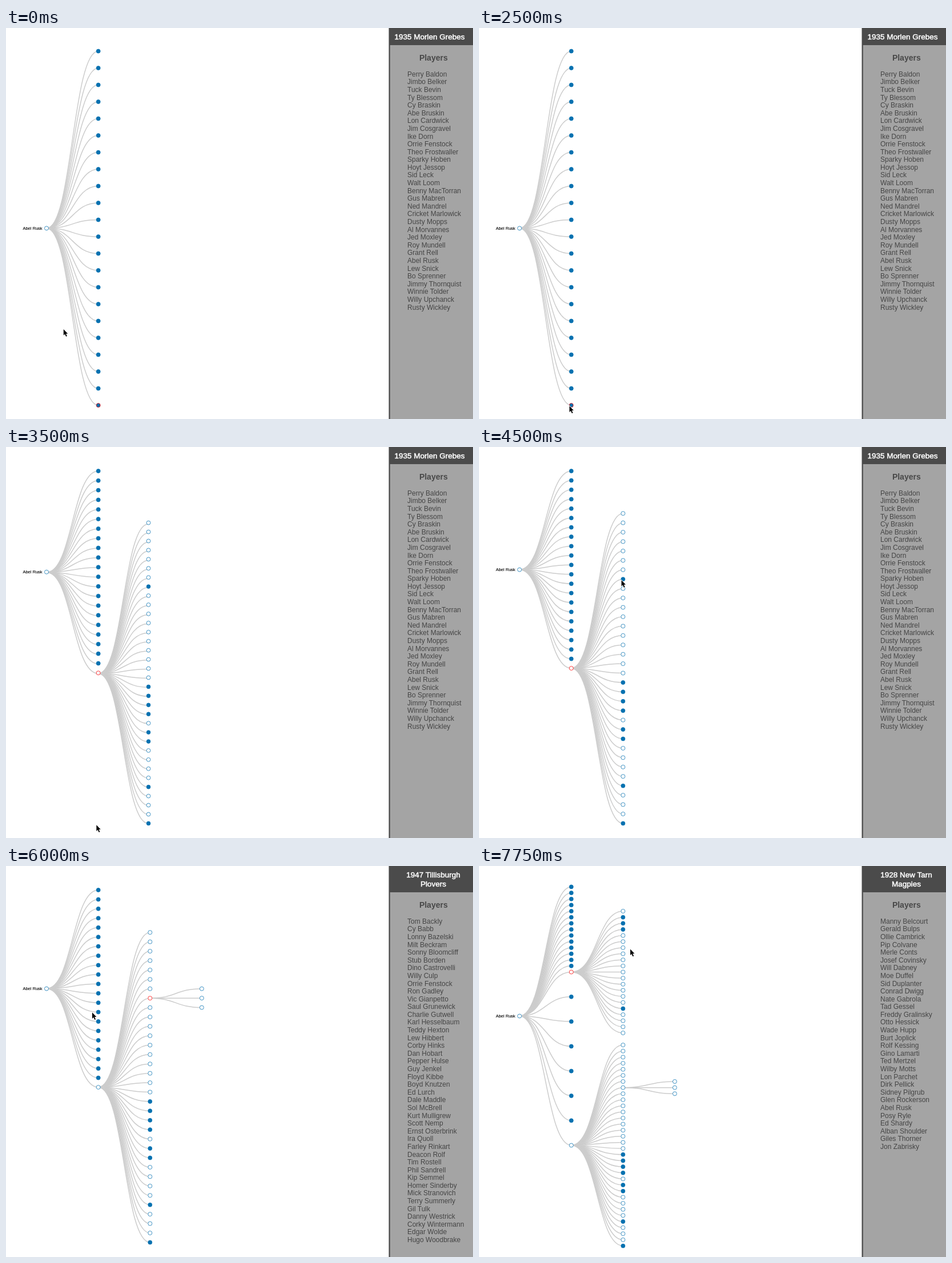
An HTML page for the animation above (8000 ms loop, 818 by 684 pixels).

```html
<!DOCTYPE html>
<html lang="en">
<head>
<meta charset="utf-8">
<title>Teammates tree</title>
<style>
  html, body { margin: 0; width: 100%; height: 100%; overflow: hidden; background: #fff; }
  svg { display: block; width: 100vw; height: 100vh; font-family: "Liberation Sans", Arial, sans-serif; }
  .link { fill: none; stroke: #ccc; stroke-width: 1.5; }
  .node { stroke: #0571b0; stroke-width: .75; }
  .selected { stroke: #f00; }
  .label { font-size: 7.5px; text-anchor: end; stroke: #000; stroke-width: .12; }
  .title { font-size: 13.5px; text-anchor: middle; fill: #fff; stroke: #fff; stroke-width: .5; }
  .heading { font-size: 14px; font-weight: bold; text-anchor: middle; fill: #484848; }
  .player { font-size: 12px; fill: #454545; }
  .cursor { fill: #000; stroke: #fff; stroke-width: 1.6; paint-order: stroke; stroke-linejoin: round; }
</style>
</head>
<body>
<svg id="stage" viewBox="0 0 818 684"></svg>
<script>
const LOOP = 8000, TICK = 250, DURATION = 750, LINK_LAG = 6;
const COLUMNS = [71, 161.7, 252.3, 342.9];
const RADIUS = 3.5;
const HUB = 'Abel Rusk';

const panels = [
  { from: 0, title: ['1935 Morlen Grebes'], titleX: 742, players:
    `Perry Baldon,Jimbo Belker,Tuck Bevin,Ty Blessom,Cy Braskin,Abe Bruskin,Lon Cardwick,Jim Cosgravel,
    Ike Dorn,Orrie Fenstock,Theo Frostwaller,Sparky Hoben,Hoyt Jessop,Sid Leck,Walt Loom,
    Benny MacTorran,Gus Mabren,Ned Mandrel,Cricket Marlowick,Dusty Mopps,Al Morvannes,Jed Moxley,
    Roy Mundell,Grant Rell,${HUB},Lew Snick,Bo Sprenner,Jimmy Thornquist,Winnie Tolder,
    Willy Upchanck,Rusty Wickley` },
  { from: 5000, title: ['1947 Tillisburgh', 'Plovers'], titleX: 748.5, players:
    `Tom Backly,Cy Babb,Lonny Bazelski,Milt Beckram,Sonny Bloomcliff,Stub Borden,Dino Castrovelli,
    Willy Culp,Orrie Fenstock,Ron Gadley,Vic Gianpetto,Saul Grunewick,Charlie Gutwell,
    Karl Hesselbaum,Teddy Hexton,Lew Hibbert,Corby Hinks,Dan Hobart,Pepper Hulse,Guy Jenkel,
    Floyd Kibbe,Boyd Knutzen,Ed Lurch,Dale Maddle,Sol McBrell,Kurt Mulligrew,Scott Nemp,
    Ernst Osterbrink,Ira Quoll,Farley Rinkart,Deacon Rolf,Tim Rostell,Phil Sandrell,Kip Semmel,
    Homer Sinderby,Mick Stranovich,Terry Summerly,Gil Tulk,Danny Westrick,Corky Wintermann,
    Edgar Wolde,Hugo Woodbrake` },
  { from: 7000, title: ['1928 New Tarn', 'Magpies'], titleX: 748.5, players:
    `Manny Belcourt,Gerald Bulps,Ollie Cambrick,Pip Colvane,Merle Conts,Josef Covinsky,Will Dabney,
    Moe Duffel,Sid Duplanter,Conrad Dwigg,Nate Gabrola,Tad Gessel,Freddy Gralinsky,Otto Hessick,
    Wade Hupp,Burt Joplick,Rolf Kessing,Gino Lamarti,Ted Mertzel,Wilby Motts,Lon Parchet,
    Dirk Pellick,Sidney Pilgrub,Glen Rockerson,${HUB},Posy Ryle,Ed Shardy,Alban Shoulder,
    Giles Thorner,Jon Zabrisky` }
];

// Pointer tip: time, x, y
const pointer = [
  [0, 100.8, 527], [250, 142, 588], [500, 136.4, 668.5], [750, 151, 666], [1000, 159, 661],
  [2500, 158.4, 661.3], [3750, 342, 300], [4000, 342.3, 280.3], [4250, 258.4, 222.4],
  [4500, 249.5, 233], [5500, 235.5, 224.3], [5750, 177.5, 321], [6000, 151, 256.3],
  [6250, 162, 284], [6500, 159, 273.3], [7500, 189.5, 250], [7750, 265, 145.5]
];

const run = (prefix, parent, depth, count, first, step) =>
  Array.from({ length: count }, (_, i) => ({ id: prefix + i, parent, x: COLUMNS[depth], y: first + i * step }));
const layout = (rootY, ...runs) =>
  new Map([{ id: 'root', x: COLUMNS[0], y: rootY }, ...runs.flat()].map(n => [n.id, n]));

// t: teams of the hub, a/b: players of an opened team, c: teams of an opened player
const wide = run('t', 'root', 1, 22, 40.5, 29.5);
const medium = run('t', 'root', 1, 22, 42, 16.43);
const tight = run('t', 'root', 1, 22, 36.4, 10.65);
tight.forEach((n, i) => { if (i > 14) n.y = 185.5 + (i - 14) * 43.3; });
const rosterMedium = run('a', 't21', 2, 34, 116.2, 16.43);

const stages = [
  { start: -LOOP, selected: 't21', nodes: layout(350.3, wide) },
  { start: 2897, selected: 't21', source: 't21', nodes: layout(214.6, medium, rosterMedium) },
  { start: 4772, selected: 'a7', source: 'a7',
    nodes: layout(214.6, medium, rosterMedium, run('c', 'a7', 3, 3, 214.7, 16.43)) },
  { start: 6649, selected: 't14', source: 't14',
    nodes: layout(262.5, tight, run('b', 't14', 2, 21, 79, 10.65),
      run('a', 't21', 2, 34, 313.1, 10.65), run('c', 'a7', 3, 3, 377, 10.65)) }
];

const closedPlayers = new Set('a7 a18 a19 a20 a21 a23 a24 a29 a33 b1 b2 b3 b16'.split(' '));
const openedAt = { t21: 1, a7: 2, t14: 3 };
const isClosed = (id, stage) =>
  (id[0] === 't' || closedPlayers.has(id)) && !(stage >= openedAt[id]) ? 1 : 0;

const lerp = (a, b, p) => a + (b - a) * p;
const cubicInOut = t => t < .5 ? 4 * t ** 3 : 1 - 4 * (1 - t) ** 3;
const progress = elapsed => cubicInOut(Math.min(1, Math.max(0, elapsed / DURATION)));
const latest = (items, test) => items.filter(test).pop();
const text = (cls, x, y, content) => `<text class="${cls}" x="${x}" y="${y}">${content}</text>`;

function drawTree(time) {
  const stage = latest([...stages.keys()], i => stages[i].start <= time);
  const { start, selected, source, nodes } = stages[stage];
  const before = stage ? stages[stage - 1].nodes : nodes;
  const place = (node, p) => {
    const from = before.get(node.id) || before.get(source);
    return [lerp(from.x, node.x, p), lerp(from.y, node.y, p)];
  };
  const nodeP = progress(time - start), linkP = progress(time - start - LINK_LAG);
  let links = '', circles = '';
  for (const node of nodes.values()) {
    if (node.parent) {
      const [x0, y0] = place(nodes.get(node.parent), linkP), [x1, y1] = place(node, linkP);
      const mid = (x0 + x1) / 2;
      links += `<path class="link" d="M${x0},${y0}C${mid},${y0} ${mid},${y1} ${x1},${y1}"/>`;
    }
    const [x, y] = place(node, nodeP);
    const r = RADIUS * (before.has(node.id) ? 1 : nodeP);
    const blue = lerp(isClosed(node.id, stage - 1), isClosed(node.id, stage), nodeP);
    const fill = [5, 113, 176].map(c => Math.round(lerp(255, c, blue)));
    circles += `<circle class="node${node.id === selected ? ' selected' : ''}" cx="${x}" cy="${y}" r="${r}" fill="rgb(${fill})"/>`;
  }
  const rootY = place(nodes.get('root'), nodeP)[1];
  return links + circles + text('label', 63.6, rootY + 2.7, HUB);
}

function drawPanel(time) {
  const { title, titleX, players } = latest(panels, p => p.from <= time);
  const shift = (title.length - 1) * 16;
  return `<rect x="670.5" width="147.5" height="684" fill="#4b4b4b"/>
    <rect x="672.75" y="${30 + shift}" width="145.25" height="${654 - shift}" fill="#a4a4a4"/>` +
    title.map((line, i) => text('title', titleX, 19.8 + i * 16, line)).join('') +
    text('heading', 748.8, 57.3 + shift, 'Players') +
    players.split(',').map((name, i) => text('player', 703, 84.8 + shift + i * 13.59, name.trim())).join('');
}

function drawCursor(time) {
  const [, x, y] = latest(pointer, p => p[0] <= time);
  return `<path class="cursor" transform="translate(${x} ${y})" d="M0,0V10.6L2.4,8.4L4.3,12.8L6.1,12L4.2,7.8H7.4Z"/>`;
}

const svg = document.getElementById('stage');
let shown = -1;
function frame() {
  const time = Math.floor(performance.now() % LOOP / TICK) * TICK;
  if (time !== shown) {
    svg.innerHTML = drawTree(time) + drawPanel(time) + drawCursor(time);
    shown = time;
  }
  requestAnimationFrame(frame);
}
frame();
</script>
</body>
</html>
```
